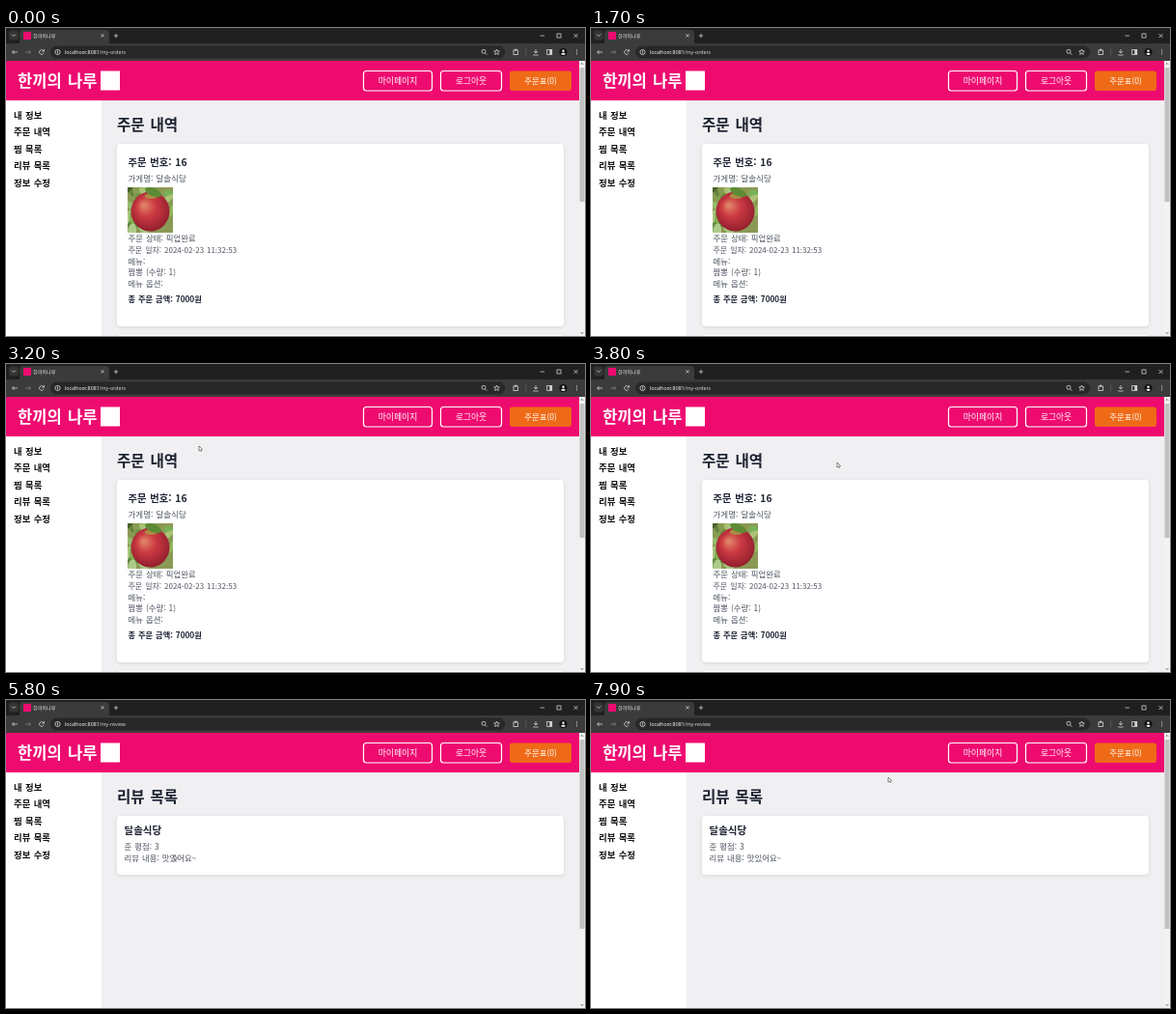
Write an HTML page with a canvas that moves like this. It is 600 px wide and 319 px high and loops after 8 s.

```html
<!DOCTYPE html>
<html lang="ko">
<head>
<meta charset="utf-8">
<title>주문 내역</title>
<style>
  html, body { margin: 0; width: 100%; height: 100%; overflow: hidden; background: #fff; }
  canvas { display: block; width: 600px; height: 319px; }
</style>
</head>
<body>
<canvas id="stage"></canvas>
<script>
const W = 600, H = 319, LOOP = 8000, STEP = 100;
const KR = '"Noto Sans CJK KR", "Noto Sans CJK", sans-serif';
const UI = '"Open Sans", "Noto Sans", sans-serif';
const PINK = '#ee0b70', INK = '#1b2130', BODY = '#4d5461', ICON = '#d6d6d6';
const BRAND = '한끼의 나루', SHOP = '달솔식당';

const ENTER = 2600, LOADING = 5100, LOADED = 5400, LISTED = 5500;
const HOVER = [4600, 5600], SELECT = [6000, 6400], CLEAR = 7000;

// Pointer glides, each from wherever the one before ended
const GLIDES = [
  { from: ENTER, to: 3800, x: 255, y: 102 },
  { from: 4200, to: 4800, x: 44, y: 141 },
  { from: 5500, to: 5900, x: 198, y: 164 },
  { from: 6000, to: 6400, x: 132, y: 139 },
  { from: 6900, to: 7100, x: 308, y: 80 }
];

const canvas = document.getElementById('stage');
const c = canvas.getContext('2d');
const dpr = window.devicePixelRatio || 1;
canvas.width = W * dpr;
canvas.height = H * dpr;

const progress = (t, from, to) => Math.min(1, Math.max(0, (t - from) / (to - from)));
const ease = k => k * k * (3 - 2 * k);

function seeded(seed) {
  return () => (seed = seed * 16807 % 2147483647) / 2147483647;
}

function rect(x, y, w, h, fill) {
  c.fillStyle = fill;
  c.fillRect(x, y, w, h);
}

function round(x, y, w, h, r, fill) {
  c.beginPath();
  c.roundRect(x, y, w, h, r);
  c.fillStyle = fill;
  c.fill();
}

function ellipse(x, y, rx, ry, fill, turn = 0) {
  c.beginPath();
  c.ellipse(x, y, rx, ry, turn, 0, Math.PI * 2);
  c.fillStyle = fill;
  c.fill();
}

function ring(x, y, r, from = 0, to = Math.PI * 2) {
  c.beginPath();
  c.arc(x, y, r, from, to);
  c.stroke();
}

function line(x1, y1, x2, y2) {
  c.beginPath();
  c.moveTo(x1, y1);
  c.lineTo(x2, y2);
  c.stroke();
}

function pen(color, width = 0.8) {
  c.strokeStyle = color;
  c.lineWidth = width;
}

// Placed by its left edge (or centre) and the middle of its line
function text(str, x, y, size, color, weight = 400, family = KR, align = 'left') {
  c.font = `${weight} ${size}px ${family}`;
  c.wordSpacing = `${size * 0.14}px`;
  c.textAlign = align;
  c.fillStyle = color;
  c.fillText(str, x, y + size * 0.39);
}

function cross(x, y, r) {
  line(x - r, y - r, x + r, y + r);
  line(x + r, y - r, x - r, y + r);
}

// Two strokes meeting at a tip, opening towards (dx, dy)
function chevron(x, y, dx, dy, r = 2) {
  line(x, y, x + (dx || -1) * r, y + (dy || -1) * r);
  line(x, y, x + (dx || 1) * r, y + (dy || 1) * r);
}

function drawTab(loading) {
  rect(0, 0, W, 17, '#1f201f');
  round(3, 2.5, 10, 10, 3, '#333433');
  pen(ICON);
  chevron(8, 8.5, 0, -1);
  round(14, 2, 93, 16, [4, 4, 0, 0], '#3b3b3b');
  if (loading) {
    ellipse(22, 8, 3, 3, '#c4c4c4');
    text('localhost:8081/my-review', 28, 7.6, 5.6, '#e6e6e6', 500, UI);
  } else {
    rect(18, 4, 8, 8, PINK);
    text(BRAND.replace(' ', ''), 28, 7.6, 5.1, '#e6e6e6', 500);
  }
  pen('#e4e4e4', 0.7);
  cross(100, 7.8, 1.6);
  line(111.8, 8, 116.2, 8);
  line(114, 5.8, 114, 10.2);
  line(553.5, 8, 558, 8);
  c.strokeRect(571, 6, 4, 4);
  cross(590.5, 8, 2);
}

function drawStar(x, y, r) {
  c.beginPath();
  for (let i = 0; i < 10; i++) {
    const a = i * Math.PI / 5 - Math.PI / 2, d = i % 2 ? r * 0.45 : r;
    c.lineTo(x + d * Math.cos(a), y + d * Math.sin(a));
  }
  c.closePath();
  c.stroke();
}

function drawToolbar(path, loading) {
  const y = 25;
  rect(0, 16, W, 18, '#3b3b3b');
  round(46, 18.5, 471, 13, 6.5, '#282828');
  pen('#858585');
  line(20, y, 25.5, y);
  chevron(25.5, y, -1, 0);
  pen(ICON);
  line(6.5, y, 12, y);
  chevron(6.5, y, 1, 0);
  if (loading) cross(37, y, 2);
  else {
    ring(37, y, 2.4, 0.5, 5.5);
    line(39.5, 22, 39.5, 24.2);
    line(39.5, 24.2, 37.4, 24.2);
  }
  ring(53.5, y, 2.6);
  line(53.5, 23.4, 53.5, 26.6);

  const host = 'localhost:8081';
  text(host, 61, y, 5.3, '#fff', 500, UI);
  text(path, 61 + c.measureText(host).width, y, 5.3, '#dcdcdc', 500, UI);

  // Zoom, bookmark, extensions
  ring(495, 24.3, 2);
  line(496.5, 25.8, 498.4, 27.7);
  drawStar(508.5, y, 3);
  c.strokeRect(526, 23, 4.5, 4.5);
  ellipse(528.2, 22.6, 1, 1, ICON);
  rect(538.5, 21, 0.7, 8, '#626262');

  // Download, side panel, profile, menu
  line(549, 22, 549, 26);
  chevron(549, 26, 0, -1);
  line(546.3, 28, 551.7, 28);
  c.strokeRect(560.7, 22.5, 5, 5);
  rect(563.3, 22.5, 2.5, 5, ICON);
  ellipse(577.5, y, 4, 4, '#111');
  ellipse(577.5, 23.8, 1.2, 1.2, '#eee');
  ellipse(577.5, 26.8, 2.2, 1.1, '#eee');
  for (let i = -1; i <= 1; i++) ellipse(591.5, y + i * 2.1, 0.6, 0.6, ICON);
}

function button(label, x, w, size, fill) {
  if (fill) round(x, 44.5, w, 20.5, 3, fill);
  else {
    c.beginPath();
    c.roundRect(x + 0.5, 44.5, w - 1, 20.5, 3);
    pen('#fff', 1.2);
    c.stroke();
  }
  text(label, x + w / 2, 54.8, size, '#fff', 400, KR, 'center');
}

function drawHeader() {
  rect(0, 34, 594, 41, PINK);
  text(BRAND, 12, 54.2, 16.6, '#fff', 900);
  rect(98, 44.5, 20, 20, '#fff');
  button('마이페이지', 370, 72, 8.8);
  button('로그아웃', 450, 64, 8.7);
  button('주문표(0)', 522, 64, 8.4, '#ef6a17');
}

function drawSidebar(hover) {
  rect(0, 75, 99, 244, '#fff');
  ['내 정보', '주문 내역', '찜 목록', '리뷰 목록', '정보 수정'].forEach((label, i) =>
    text(label, 8, 90 + i * 17.6, 9.4, '#101010', 700));
  if (hover) rect(8, 149.5, 83, 0.9, '#c0c0c4');
}

function card(y, h) {
  c.save();
  c.shadowColor = 'rgba(0,0,0,.1)';
  c.shadowBlur = 4 * dpr;
  c.shadowOffsetY = dpr;
  round(115, y, 463, h, 4, '#fff');
  c.restore();
}

function drawPhoto(x, y, size) {
  const rand = seeded(11), mid = size / 2;
  c.save();
  c.translate(x, y);
  c.beginPath();
  c.rect(0, 0, size, size);
  c.clip();
  rect(0, 0, size, size, '#8a9a55');
  for (let i = 0; i < 26; i++) {
    const tone = `hsl(${75 + rand() * 25} 38% ${28 + rand() * 42}%)`;
    ellipse(rand() * size, rand() * size, 3 + rand() * 6, 2 + rand() * 3, tone, rand() * 3);
  }
  const skin = c.createRadialGradient(mid - 7, mid - 5, 1, mid, mid, mid);
  skin.addColorStop(0, '#e08468');
  skin.addColorStop(0.4, '#cc3a42');
  skin.addColorStop(1, '#8c1c2c');
  ellipse(mid, mid + 1.5, 20, 20.5, skin);
  ellipse(mid + 1, 9, 7, 3, '#b08a45');
  ellipse(mid + 3, 5, 9, 4, '#5d8a35', 0.4);
  c.restore();
}

function drawOrders() {
  text('주문 내역', 115, 100, 15.6, INK, 700);
  card(120, 189);
  card(317.5, 20);
  text('주문 번호: 16', 126.5, 139, 10.3, INK, 700);
  text('가게명: ' + SHOP, 126.5, 155.5, 8.5, BODY);
  drawPhoto(126, 165, 47);
  const row = i => 217.8 + i * 11.8;
  text('주문 상태: 픽업완료', 126.5, row(0), 8.4, BODY);
  text('주문 일자: 2024-02-23 11:32:53', 126.5, row(1), 8, BODY);
  text('메뉴:', 126.5, row(2), 8.4, BODY);
  text('짬뽕 (수량: 1)', 126.5, row(3), 8.4, BODY);
  text('메뉴 옵션:', 126.5, row(4), 8.4, BODY);
  text('총 주문 금액: 7000원', 126.5, 280.7, 8.2, INK, 700);
}

function reviewLines(color) {
  text('준 평점: 3', 122.5, 152, 8.4, color);
  text('리뷰 내용: 맛있어요~', 122.5, 163.3, 8.4, color);
}

// Grows backwards from the end of the lower line into the upper one
function drawSelection(t) {
  if (t < SELECT[0] || t >= CLEAR) return;
  const lineW = 76, restW = 19;
  const picked = progress(t, ...SELECT) * (lineW + restW);
  const lower = Math.min(picked, lineW), upper = picked - lower;
  c.save();
  c.beginPath();
  c.rect(198 - lower, 157.5, lower, 11.7);
  c.rect(159.5 - upper, 146, upper, 11.5);
  c.clip();
  rect(115, 140, 100, 35, '#2f62c6');
  reviewLines('#fff');
  c.restore();
}

function drawReviews(t) {
  text('리뷰 목록', 115, 100, 15.6, INK, 700);
  if (t < LISTED) return;
  card(120, 61);
  text(SHOP, 122.5, 134.5, 10.5, INK, 700);
  reviewLines(BODY);
  drawSelection(t);
}

function drawScrollbar(end) {
  rect(594, 34, 6, 285, '#f3f3f3');
  rect(594.5, 41, 5, end - 41, '#c1c1c1');
  pen('#555', 1);
  chevron(597, 36.5, 0, 1, 1.2);
  chevron(597, 316.5, 0, -1, 1.2);
}

function pointerAt(t) {
  let x = 145, y = 68;
  for (const g of GLIDES) {
    const k = ease(progress(t, g.from, g.to));
    x += (g.x - x) * k;
    y += (g.y - y) * k;
  }
  return [x, y];
}

function drawPointer(t) {
  if (t < ENTER) return;
  c.save();
  c.translate(...pointerAt(t));
  pen('#333', 0.6);
  line(1.5, 3.5, 2.5, 5.8);
  c.beginPath();
  c.moveTo(0, 0);
  c.lineTo(0, 5);
  c.lineTo(3.6, 3.6);
  c.closePath();
  c.fillStyle = '#fff';
  c.fill();
  c.stroke();
  c.restore();
}

function draw(t) {
  const loading = t >= LOADING && t < LOADED;
  const review = t >= LOADED;
  c.setTransform(dpr, 0, 0, dpr, 0, 0);
  rect(0, 0, W, H, '#f0f0f2');
  if (review) drawReviews(t);
  else drawOrders();
  drawSidebar(t >= HOVER[0] && t < HOVER[1]);
  drawHeader();
  drawScrollbar(review ? 237 : 180);
  drawTab(loading);
  drawToolbar(t >= LOADING ? '/my-review' : '/my-orders', loading);
  drawPointer(t);
}

const start = performance.now();
function tick() {
  const t = (performance.now() - start) % LOOP;
  draw(Math.floor(t / STEP) * STEP);
  requestAnimationFrame(tick);
}
tick();
</script>
</body>
</html>
```
